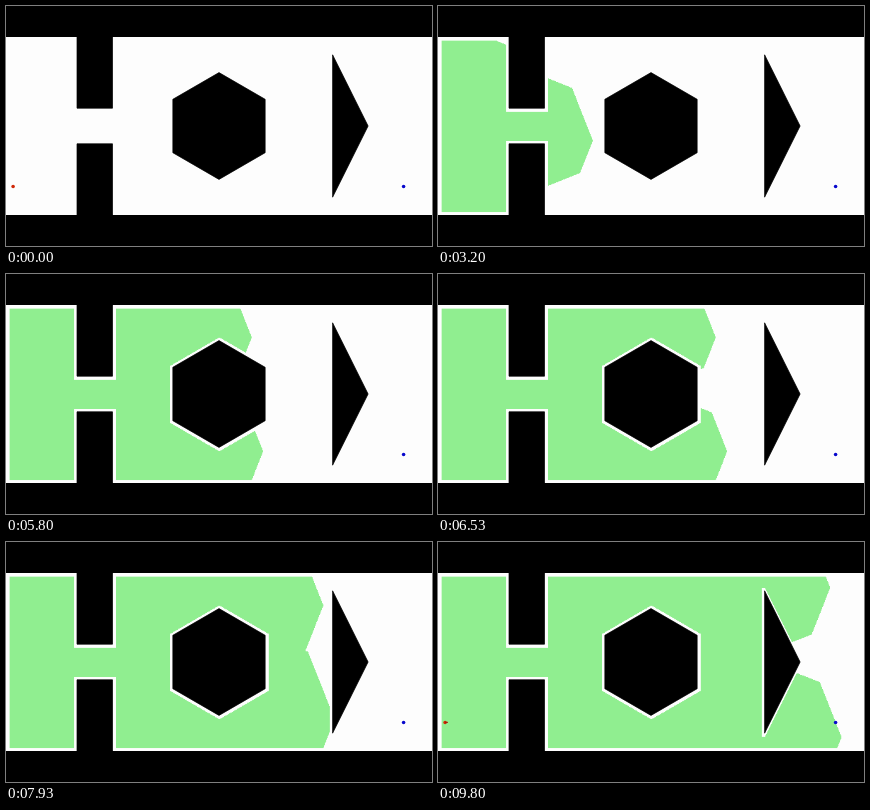
Write an HTML page with a canvas that moves like this. It is 426 px wide and 240 px high and loops after 9870 ms.

```html
<!DOCTYPE html>
<html lang="en">
<head>
<meta charset="utf-8">
<title>Dijkstra flood</title>
<style>
  html, body { margin: 0; width: 100%; height: 100%; overflow: hidden; background: #000; }
  canvas { display: block; width: 426px; height: 240px; }
</style>
</head>
<body>
<canvas id="stage" width="426" height="240"></canvas>
<script>
const W = 600, H = 250, TOP = 31;
const SCALE_X = 426 / W, SCALE_Y = 178 / H;
const LOOP = 9870, LAST = 147, FILLED = 145;
const START = { x: 10, y: 210 }, GOAL = { x: 560, y: 210 };
const CLEAR = 5;

const OBSTACLES = [
  [[100, 0], [150, 0], [150, 100], [100, 100]],
  [[100, 150], [150, 150], [150, 250], [100, 250]],
  [[300, 50], [365, 87.5], [365, 162.5], [300, 200], [235, 162.5], [235, 87.5]],
  [[460, 25], [510, 125], [460, 225]]
];

// True where the robot may stand, keeping clear of walls and obstacles
function isFree(x, y) {
  if (x < CLEAR || y < CLEAR || x > W - CLEAR || y > H - CLEAR) return false;
  const dy = Math.abs(y - 125), dx = Math.abs(x - 300);
  if (x > 100 - CLEAR && x < 150 + CLEAR && dy > 25 - CLEAR) return false;
  if (dx < 65 + CLEAR && dy + dx * 0.577 < 75 + CLEAR) return false;
  return !(x > 460 - CLEAR && dy < 100 + CLEAR && dy + 2 * (x - 460) < 100 + CLEAR);
}

// Dijkstra on an 8-connected grid; buckets hold cells by cost (10 straight, 14 diagonal)
function explore() {
  const cost = new Int32Array(W * H).fill(1e9);
  const done = new Uint8Array(W * H);
  const order = [], buckets = [];
  const goal = GOAL.y * W + GOAL.x;
  const push = (cell, c) => {
    cost[cell] = c;
    (buckets[c] ||= []).push(cell);
  };
  push(START.y * W + START.x, 0);
  for (let c = 0; c < buckets.length; c++) {
    for (const cell of buckets[c] || []) {
      if (done[cell]) continue;
      done[cell] = 1;
      order.push(cell);
      if (cell === goal) return order;
      const x = cell % W, y = (cell - x) / W;
      for (let dy = -1; dy <= 1; dy++) {
        for (let dx = -1; dx <= 1; dx++) {
          const next = cell + dy * W + dx;
          const total = c + (dx && dy ? 14 : 10);
          if (total < cost[next] && isFree(x + dx, y + dy)) push(next, total);
        }
      }
    }
  }
  return order;
}

const ctx = document.getElementById('stage').getContext('2d');
const layer = document.createElement('canvas');
layer.width = W;
layer.height = H;
const layerCtx = layer.getContext('2d');
const image = layerCtx.createImageData(W, H);
const pixels = image.data;
for (let i = 0; i < pixels.length; i += 4) {
  pixels[i] = pixels[i + 2] = 144;
  pixels[i + 1] = 238;
}
const order = explore();
let shown = 0;

function showCells(count) {
  while (shown < count) pixels[order[shown++] * 4 + 3] = 255;
  while (shown > count) pixels[order[--shown] * 4 + 3] = 0;
  layerCtx.putImageData(image, 0, 0);
}

function dot(p, color) {
  ctx.fillStyle = color;
  ctx.beginPath();
  ctx.arc(p.x, p.y, 2.5, 0, Math.PI * 2);
  ctx.fill();
}

function draw(step) {
  showCells(Math.round(order.length * Math.min(1, step / FILLED)));
  ctx.setTransform(1, 0, 0, 1, 0, 0);
  ctx.fillStyle = '#000';
  ctx.fillRect(0, 0, 426, 240);
  ctx.setTransform(SCALE_X, 0, 0, SCALE_Y, 0, TOP);
  ctx.fillStyle = '#fdfdfd';
  ctx.fillRect(0, 0, W, H);
  ctx.drawImage(layer, 0, 0);
  ctx.fillStyle = ctx.strokeStyle = '#000';
  ctx.lineWidth = 1;
  for (const points of OBSTACLES) {
    ctx.beginPath();
    points.forEach(([x, y]) => ctx.lineTo(x, y));
    ctx.closePath();
    ctx.fill();
    ctx.stroke();
  }
  dot(GOAL, '#0808cc');
  if (step === 0 || step > FILLED) dot(START, '#d02808');
  if (step > FILLED) {
    ctx.fillStyle = '#a01808';
    ctx.fillRect(START.x, START.y - 1, 2 * (step - FILLED), 1.5);
  }
}

// Fifteen steps a second, on a 70 / 60 / 70 ms beat
function stepAt(t) {
  const r = t % 200;
  return Math.min(LAST, 3 * Math.floor(t / 200) + (r >= 70) + (r >= 130));
}

let last = -1;
function tick() {
  const step = stepAt(performance.now() % LOOP);
  if (step !== last) draw(last = step);
  requestAnimationFrame(tick);
}
tick();
</script>
</body>
</html>
```
